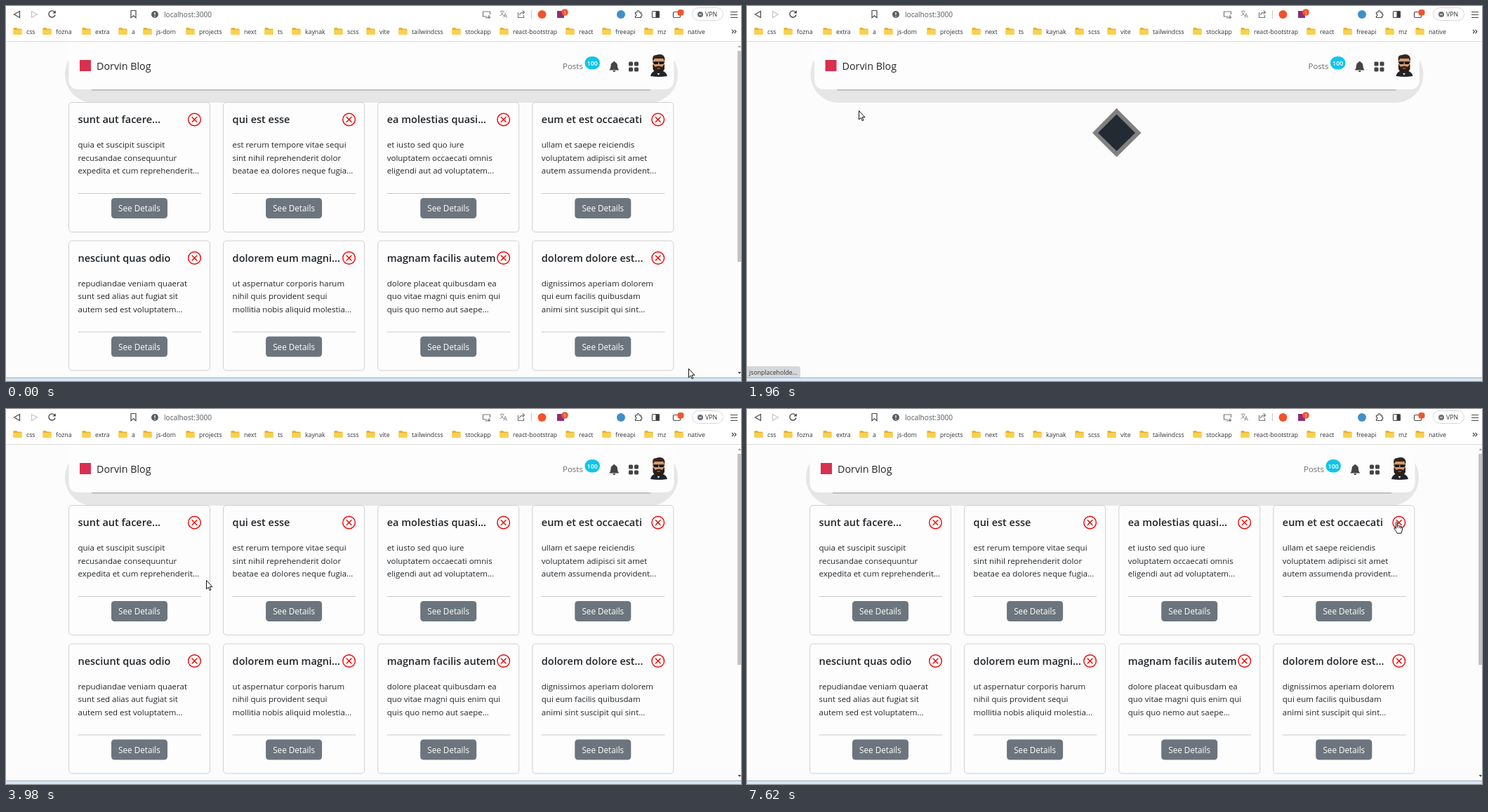
Animation of 1047 by 535 pixels, one loop 8000 ms. Source, as an HTML page:

```html
<!DOCTYPE html>
<html lang="en">
<head>
<meta charset="utf-8">
<title>Blog page reload</title>
<style>
  html, body { margin: 0; width: 100%; height: 100%; overflow: hidden; background: #fff; }
  svg { display: block; font: 11.5px "Open Sans", "Noto Sans", sans-serif; fill: #212529; }
  .line { fill: none; stroke: #4a4a4a; stroke-width: 1.2; }
  .small { font-size: 8.75px; fill: #333; }
  .title { font-size: 14.5px; font-weight: 600; }
  .white { fill: #fff; }
  .dark { fill: #444; }
  .mid { text-anchor: middle; }
</style>
</head>
<body>
<svg width="1047" height="535" viewBox="0 0 1047 535">
  <rect width="1047" height="535" fill="#fff"/>
  <rect y="51" width="1047" height="479" fill="#fcfcfc"/>
  <path d="M0 50.5H1047" stroke="#dcdcdc"/>
  <rect y="530" width="1047" height="5" fill="#d8e8f7"/>
  <path d="M0 530.5H1047" stroke="#a4adb7"/>

  <!-- browser toolbar -->
  <g class="line">
    <path d="M19.5 7.5V16.5L11.5 12Z"/>
    <path d="M36.5 7.5V16.5L44.5 12Z" stroke="#c4c4c4"/>
    <g id="reload"><path d="M69.3 8.8A4.6 4.6 0 1 0 70 12.5" stroke-width="1.4"/><path class="dark" stroke="none" d="M70.8 6.2V10.4H66.5Z"/></g>
    <g id="stop"><rect x="55" y="1" width="21" height="21" rx="2" fill="#e4e4e4" stroke="none"/><path d="M62 8L69 15M69 8L62 15"/></g>
    <path d="M178 6.5H185V16.8L181.500 13.800L178 16.800Z"/>
    <g id="install" stroke="#777"><path d="M685 15H679.500V8H689.500V12M683 17H686M688 13V17M686 15.500L688 17.500L690 15.500"/></g>
    <path d="M729.500 9V16.500H737.500V13M731.500 13C732 10.500 734 9 738 9M735.800 6.300L738.500 9L735.800 11.700" stroke="#777"/>
    <path d="M748.500 6V18" stroke="#ccc"/>
    <path d="M896.500 9H899V8A1.500 1.500 0 0 1 902 8V9H904.500V11.500A1.500 1.500 0 0 1 904.500 14.500V16.500H896.500V14.500A1.500 1.500 0 0 0 896.500 11.500Z"/>
    <rect x="920.500" y="7.500" width="10" height="9" rx="1"/>
    <path d="M926 8H930V16H926Z" fill="#333"/>
    <rect x="950.500" y="8.500" width="10" height="8" rx="1.500"/>
    <path d="M957 12.500H961"/>
    <rect x="977.500" y="2.500" width="44" height="18" rx="9" stroke="#d8d8d8" stroke-width="1"/>
    <path d="M1032 8.500H1042M1032 12.500H1042M1032 16.500H1042"/>
    <path d="M1034 34L1036.500 36.500L1034 39M1037.500 34L1040 36.500L1037.500 39"/>
  </g>
  <circle cx="212" cy="12" r="5" fill="#5a5e63"/>
  <path d="M212 9V12.700M212 14V15.200" stroke="#fff" stroke-width="1.300"/>
  <text x="225" y="15.500" font-size="10.1" fill="#565a5f">localhost:3000</text>
  <g id="translate" fill="#777"><text x="703" y="13" font-size="7.500" font-family="Noto Sans CJK SC, Noto Sans CJK, sans-serif" fill="#777">文</text><text x="708.500" y="17" font-size="8.500">A</text></g>
  <circle cx="763.500" cy="12" r="6" fill="#f2522b"/>
  <rect x="785" y="7" width="10" height="10" fill="#8c2f78"/>
  <circle cx="796" cy="9" r="4.800" fill="#f2542d"/>
  <text class="white mid" x="796" y="11.500" font-size="7">1</text>
  <circle cx="876" cy="12" r="6" fill="#3f8fc9"/>
  <rect x="956.500" y="5" width="9" height="8.500" rx="3.500" fill="#f2542d"/>
  <circle cx="989" cy="12" r="4" fill="#6a6f76"/>
  <path d="M987 12H991" stroke="#fff"/>
  <text class="small" x="996" y="15">VPN</text>
  <g id="bookmarks" class="small"></g>

  <!-- page header -->
  <g id="header">
    <rect x="84" y="57" width="873" height="81" rx="40" fill="#e6e6e6"/>
    <path d="M122 119.800H918" stroke="#b4b4b4" stroke-width="1.600"/>
    <path d="M89.500 52H951.500V105Q951.500 119 937 119H104Q89.500 119 89.500 105Z" fill="#fdfdfd"/>
    <rect x="105" y="77" width="16" height="16" fill="#d9304f"/>
    <text x="129" y="91" font-size="14.3">Dorvin Blog</text>
    <text x="793" y="90" fill="#6a6a6a">Posts</text>
    <rect x="824.500" y="72" width="21.500" height="18.500" rx="9.250" fill="#12c4ea"/>
    <text class="white mid" x="835.300" y="84.700" font-size="9" font-weight="600">100</text>
    <path class="dark" d="M865.300 79H867.300V80Q871 81 871 85.500Q871 89 873.300 91.500H859.300Q861.500 89 861.500 85.500Q861.500 81 865.300 80ZM864.300 92.300H868.300Q868 94.300 866.300 94.300Q864.600 94.300 864.300 92.300Z"/>
    <g class="dark"><rect x="887" y="79.500" width="6" height="6" rx="1.500"/><rect x="895" y="79.500" width="6" height="6" rx="1.500"/><rect x="887" y="87.500" width="6" height="6" rx="1.500"/><rect x="895" y="87.500" width="6" height="6" rx="1.500"/></g>
    <!-- avatar -->
    <path d="M918 100Q919 94 925 92.500H934Q941 94 942 100Q930 102 918 100Z" fill="#20242b"/>
    <path d="M926 93L929.500 99L933 93Z" fill="#e8e8e8"/>
    <rect x="921.500" y="74" width="16.500" height="17" rx="6" fill="#d69a6b"/>
    <path d="M921.500 79Q919.500 70 926 70Q935 67 938 73Q939 76 938 79L936 75H924Z" fill="#35251e"/>
    <path d="M921.500 83L925 87Q929.700 84.500 934.500 87L938 83V90Q935 96 929.700 96Q924.500 96 921.500 90Z" fill="#2b1d18"/>
    <path d="M922 79.500H929V83H923ZM930.500 79.500H937.500L936.500 83H930.500Z" fill="#15171b"/>
    <path d="M921 80H938.500" stroke="#15171b"/>
    <path d="M927.500 89H932" stroke="#c98b75"/>
  </g>

  <g id="cards"></g>
  <g id="scrollbar">
    <rect x="1042" y="64" width="5" height="301" fill="#c3c3c3"/>
    <path d="M1042.500 59L1045 56L1047 59Z" fill="#a0a0a0"/>
    <path d="M1042.500 522H1047L1045 525Z" fill="#444"/>
  </g>

  <!-- loader fills from the top down -->
  <clipPath id="level"><rect id="fill" x="490" y="146" width="74" height="0"/></clipPath>
  <g id="loader">
    <path d="M526.500 146L561.500 181L526.500 215.500L492 181Z" fill="#808080"/>
    <path d="M526.500 146L561.500 181L526.500 215.500L492 181Z" fill="#e03603" clip-path="url(#level)"/>
    <path d="M526.500 154.500L553 181L526.500 207L500 181Z" fill="#222b33"/>
  </g>

  <g id="status">
    <path d="M0 514H73Q76 514 76 517V530H0Z" fill="#d5d8db"/>
    <text class="small" x="3" y="525.500">jsonplaceholde...</text>
  </g>

  <g id="cursor" stroke-linejoin="round">
    <path id="arrow" d="M.5 .5V13L3.300 10.300L5.200 14.800L7 14L5.100 9.700H9Z" fill="#fff" stroke="#111"/>
    <path id="hand" d="M3.500 9.500V1.800Q4.500 0 5.500 1.800V6.500Q8 5.500 8.500 7.200Q10.500 6.500 10.700 8Q12.500 7.800 12.500 9.500V12Q12 15 10.800 17.300H5.300Q4 14.500 1 11Q.3 8.500 3.500 10.500ZM5.500 6.500V9M8.200 7.500V10M10.500 8V10.500" fill="#fff" stroke="#111"/>
    <path id="beam" d="M0 .5H2.300L3 1L3.700 .5H6M3 1V12M0 12.500H2.300L3 12L3.700 12.500H6" fill="none" stroke="#111"/>
  </g>
</svg>
<script>
const el = id => document.getElementById(id);
const show = (id, on) => el(id).style.display = on ? '' : 'none';
const move = (id, x, y) => el(id).setAttribute('transform', `translate(${x} ${y})`);

const bookmarks = {
  css: 29, fozna: 71, extra: 127, a: 179, 'js-dom': 214, projects: 275, next: 339, ts: 387,
  kaynak: 426, scss: 486, vite: 532, tailwindcss: 578, stockapp: 654, 'react-bootstrap': 722,
  react: 816, freeapi: 868, mz: 928, native: 971
};
el('bookmarks').innerHTML = Object.entries(bookmarks).map(([name, x]) => `
  <path d="M${x - 18.5} 32q0-1 1-1h3.500l1.500 1.500h5q1 0 1 1v6.500q0 1-1 1h-10q-1 0-1-1z" fill="#e5b32c"/>
  <path d="M${x - 18.5} 34h12v6q0 1-1 1h-10q-1 0-1-1z" fill="#fbd04f"/>
  <text x="${x}" y="39.500">${name}</text>`).join('');

const posts = [
  'sunt aut facere...|quia et suscipit suscipit|recusandae consequuntur|expedita et cum reprehenderit...',
  'qui est esse|est rerum tempore vitae sequi|sint nihil reprehenderit dolor|beatae ea dolores neque fugia...',
  'ea molestias quasi...|et iusto sed quo iure|voluptatem occaecati omnis|eligendi aut ad voluptatem...',
  'eum et est occaecati|ullam et saepe reiciendis|voluptatem adipisci sit amet|autem assumenda provident...',
  'nesciunt quas odio|repudiandae veniam quaerat|sunt sed alias aut fugiat sit|autem sed est voluptatem...',
  'dolorem eum magni...|ut aspernatur corporis harum|nihil quis provident sequi|mollitia nobis aliquid molestia...',
  'magnam facilis autem|dolore placeat quibusdam ea|quo vitae magni quis enim qui|quis quo nemo aut saepe...',
  'dolorem dolore est...|dignissimos aperiam dolorem|qui eum facilis quibusdam|animi sint suscipit qui sint...'
];
el('cards').innerHTML = posts.map((post, i) => {
  const [title, ...lines] = post.split('|');
  return `<g transform="translate(${89.5 + i % 4 * 220.1} ${137.5 + (i > 3) * 197.5})">
    <rect width="201" height="185" rx="4.500" fill="#fdfdfd" stroke="#d0d0d0"/>
    <text class="title" x="13" y="29.800">${title}</text>
    ${lines.map((line, n) => `<text x="13" y="${64.8 + n * 18.5}">${line}</text>`).join('')}
    <g fill="none" stroke="#f00000" stroke-width="1.400"><circle cx="179" cy="24.500" r="8.800"/><path d="M175.300 20.800l7.400 7.400m0-7.400l-7.400 7.400"/></g>
    <path d="M13 130H188.500" stroke="#c9c9c9"/>
    <rect x="60.500" y="136.500" width="80" height="29" rx="4.500" fill="#6c757d"/>
    <text class="white mid" x="100.500" y="155.700" font-size="11.7">See Details</text>
  </g>`;
}).join('');

// time, pointer x, pointer y, pointer shape
const steps = [
  [0, 972, 517, 'arrow'], [330, 223, 113, 'arrow'], [630, 130, 45, 'arrow'], [960, 61, 7, 'arrow'],
  [1300, 61, 7, 'arrow'], [1630, 152, 137, 'hand'], [1960, 159, 149, 'arrow'], [2290, 159, 149, 'arrow'],
  [2630, 159, 149, 'arrow'], [2960, 159, 149, 'arrow'], [3310, 202, 184, 'arrow'], [3650, 285, 244, 'arrow'],
  [4640, 354, 254, 'arrow'], [4970, 708, 232, 'arrow'], [5310, 888, 225, 'arrow'], [5640, 351, 224, 'arrow'],
  [5970, 132, 191, 'beam'], [6300, 248, 147, 'arrow'], [6630, 672, 147, 'arrow'], [6960, 846, 140, 'arrow'],
  [7290, 879, 150, 'beam'], [7620, 921, 160, 'hand']
];

function draw(t) {
  const [time, x, y, shape] = steps.findLast(step => step[0] <= t);
  const stopping = t >= 1300 && t < 1960;
  const loading = t >= 1960 && t < 3980;

  move('cursor', x, y);
  for (const id of ['arrow', 'hand', 'beam']) show(id, id === shape);

  show('stop', stopping);
  show('reload', !stopping);
  show('translate', !stopping);
  show('install', t < 1300 || t >= 1630);
  move('install', stopping ? 24.5 : 0, 0);

  move('header', loading ? 6.5 : 0, 0);
  show('cards', !loading);
  show('scrollbar', !loading);
  show('loader', loading);
  el('fill').setAttribute('height', Math.max(0, (time - 1930) * .0415));

  show('status', t >= 1300 && t < 2630);
  el('status').setAttribute('opacity', t < 2290 ? 1 : .15);
}

function tick() {
  draw(performance.now() % 8000);
  requestAnimationFrame(tick);
}
tick();
</script>
</body>
</html>
```
